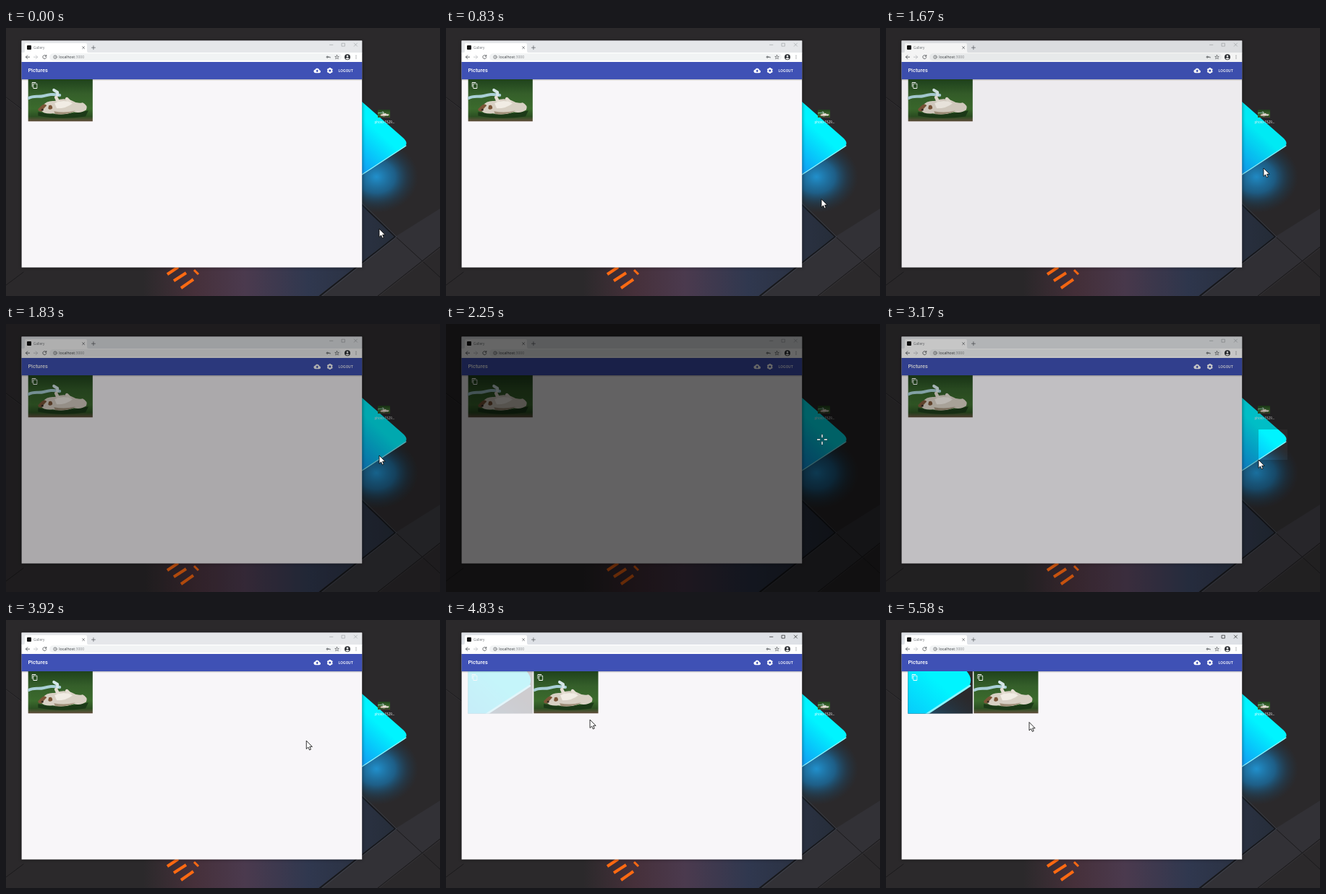
An HTML page for the animation above (5660 ms loop, 600 by 371 pixels).

```html
<!DOCTYPE html>
<html lang="en">
<head>
<meta charset="utf-8">
<title>Gallery paste demo</title>
<style>
  html, body { margin: 0; width: 100%; height: 100%; overflow: hidden; background: #2a292b; }
  svg { display: block; }
  #stage { width: 100%; height: 100%; }
  text { font-family: Roboto, sans-serif; }
  .ui { font-family: "Open Sans", "Noto Sans", sans-serif; }
  .line { fill: none; stroke-linecap: round; stroke-linejoin: round; }
</style>
</head>
<body>
<svg id="stage" viewBox="0 0 600 371">
  <defs>
    <linearGradient id="cyan" gradientUnits="userSpaceOnUse" x1="480" y1="196" x2="522" y2="150">
      <stop offset="0" stop-color="#1494f0"/>
      <stop offset=".5" stop-color="#08c4fa"/>
      <stop offset="1" stop-color="#00f4ff"/>
    </linearGradient>
    <radialGradient id="glow">
      <stop offset="0" stop-color="#2190cc"/>
      <stop offset=".45" stop-color="#1b6c9e" stop-opacity=".8"/>
      <stop offset=".75" stop-color="#1b4e70" stop-opacity=".35"/>
      <stop offset="1" stop-color="#1b3c54" stop-opacity="0"/>
    </radialGradient>
    <linearGradient id="pad" gradientUnits="userSpaceOnUse" x1="190" y1="0" x2="540" y2="0">
      <stop offset="0" stop-color="#2b292b"/>
      <stop offset=".2" stop-color="#46303a"/>
      <stop offset=".4" stop-color="#4b3a4e"/>
      <stop offset=".65" stop-color="#30384f"/>
      <stop offset="1" stop-color="#262d39"/>
    </linearGradient>
    <linearGradient id="grass" x2="0" y2="1">
      <stop offset="0" stop-color="#1f421c"/>
      <stop offset=".35" stop-color="#355f2a"/>
      <stop offset=".7" stop-color="#3b6b2d"/>
      <stop offset=".88" stop-color="#2c5022"/>
      <stop offset="1" stop-color="#66503f"/>
    </linearGradient>
    <filter id="soft" x="-10%" y="-10%" width="120%" height="120%"><feGaussianBlur stdDeviation="2"/></filter>
    <filter id="blur"><feGaussianBlur stdDeviation=".7"/></filter>

    <g id="copy">
      <path fill="#fff" transform="scale(.4)" d="M16 1H4c-1.1 0-2 .9-2 2v14h2V3h12V1zm3 4H8c-1.1 0-2 .9-2 2v14c0 1.1.9 2 2 2h11c1.1 0 2-.9 2-2V7c0-1.1-.9-2-2-2zm0 16H8V7h11v14z"/>
    </g>

    <symbol id="dog" viewBox="0 0 90 58" preserveAspectRatio="none">
      <rect width="90" height="58" fill="url(#grass)"/>
      <g filter="url(#blur)">
        <path class="line" stroke="#a9cfd6" stroke-width="4" d="M1 26C8 22 15 25 22 23S34 20 44 22"/>
        <path class="line" stroke="#d5e6e8" stroke-width="4" d="M36 15L41 18V22"/>
        <path fill="#1c3a18" d="M14 45Q45 52 84 43L80 51Q45 56 14 50Z"/>
        <path fill="#d8d0c4" d="M21 36Q26 29 37 30Q48 25 60 29Q68 34 76 32Q84 36 81 42Q74 47 64 45Q50 50 34 47Q22 48 18 43Q17 39 21 36Z"/>
        <path class="line" stroke="#e4ddd2" stroke-width="4.5" d="M42 31L39 25M58 31L54 27"/>
        <path fill="#f1ece4" d="M37 33Q50 27 62 33Q54 40 40 40Z"/>
        <path fill="#7c5638" d="M18 37Q23 32 26 36Q22 40 19 44Q14 45 14 41ZM29 36Q34 34 34 40Q30 43 28 40Z"/>
        <path fill="#a09079" d="M36 44Q52 47 66 43Q56 49 38 48Z"/>
        <circle cx="20" cy="42" r="1.4" fill="#332820"/>
      </g>
    </symbol>

    <g id="desk">
      <rect width="600" height="371" fill="#2b292b"/>
      <path fill="#323136" d="M538 289L434 371H514L600 303V250Z"/>
      <path fill="url(#pad)" d="M190 371V331L250 325L470 222L537 289L432 371Z"/>
      <path class="line" stroke="#15171c" stroke-width="1.6" d="M488 241L538 289L434 371"/>
      <path class="line" stroke="#464c58" stroke-width=".6" d="M490 240L540 289L437 371"/>
      <path class="line" stroke="#1b1a1c" d="M600 303L514 371M0 96L24 114M0 356L24 338M540 290L600 345"/>
      <path class="line" stroke="#3b393c" stroke-width=".5" d="M600 305L516 371M0 97L24 115"/>
      <ellipse cx="512" cy="206" rx="58" ry="50" fill="url(#glow)"/>
      <path fill="url(#cyan)" d="M470 83L492 102L549 152Q557 159 551 165L492 203L470 217Z"/>
      <path class="line" stroke="#8df4ff" stroke-width="1.2" d="M553 163L492 203"/>
      <g class="line" stroke="#ff6a12" stroke-width="4" style="stroke-linecap:butt">
        <path d="M223 341L238 331M232 350L249 339M242 360L259 348"/>
        <path stroke-width="3" d="M260 335L266 341"/>
      </g>
      <use href="#dog" x="514" y="113" width="17" height="11"/>
      <text class="ui" x="523.5" y="131.6" font-size="4.5" fill="#fff" text-anchor="middle">photo-1529...</text>
    </g>
  </defs>

  <use href="#desk"/>

  <rect x="21" y="18" width="472" height="314" fill="#000" opacity=".4" filter="url(#soft)"/>
  <g id="window">
    <rect x="21.6" y="17.6" width="470.6" height="313.9" fill="#f8f6f9"/>
    <rect id="strip" x="21.6" y="17.6" width="470.6" height="17"/>
    <path fill="#fff" d="M21.6 34H24Q26 34 26 32V23Q26 21 28 21H110Q112 21 112 23V32Q112 34 114 34H492.2V47H21.6Z"/>
    <rect x="29" y="24" width="6" height="6" rx="1" fill="#111"/>
    <text class="ui" x="38" y="29.2" font-size="4.7" fill="#74777b">Gallery</text>
    <g class="line" stroke="#55585c" stroke-width=".7">
      <path d="M105.6 25.7l3 3m0-3l-3 3M118.4 27.2h5m-2.5-2.5v5"/>
    </g>
    <g id="controls" class="line" stroke-width=".7">
      <path d="M447.5 23.3h4.4M464.4 21.2h4v4h-4zM481.3 21l4.2 4.2m0-4.2l-4.2 4.2"/>
    </g>
    <rect x="60" y="35.2" width="404" height="10" rx="5" fill="#f1f3f4"/>
    <g class="line" stroke="#505357" stroke-width=".85">
      <path d="M32.6 40.2h-5.2m2.4-2.4l-2.4 2.4 2.4 2.4"/>
      <path stroke="#bfc1c4" d="M38.4 40.2h5.2m-2.4-2.4l2.4 2.4-2.4 2.4"/>
      <path d="M55.4 38.7a2.5 2.5 0 1 0 .4 2M55.8 37.4v1.7h-1.7"/>
      <circle cx="68" cy="40.2" r="2.3" stroke-width=".6"/>
      <path stroke-width=".6" d="M68 40v1.2M68 39v.1"/>
      <circle cx="444.2" cy="40.2" r="1.1"/>
      <path d="M445.3 40.2h2.8v.9"/>
      <path stroke-width=".6" d="M457.5 37.5l.8 1.9 2 .1-1.6 1.3.6 2-1.8-1.1-1.8 1.1.6-2-1.6-1.3 2-.1z"/>
    </g>
    <text class="ui" x="73.3" y="42.1" font-size="5.2" fill="#33363a">localhost<tspan fill="#85888c">:3000</tspan></text>
    <circle cx="472" cy="40.2" r="4" fill="#2f3236"/>
    <circle cx="472" cy="39.1" r="1.3" fill="#fff"/>
    <path fill="#fff" d="M469.4 42.5Q472 39.9 474.6 42.5Q472 44.6 469.4 42.5Z"/>
    <path class="line" stroke="#505357" stroke-width="1" d="M484 38.2v0M484 40.2v0M484 42.2v0"/>

    <rect x="21.6" y="70" width="470.6" height="2.4" fill="#000" opacity=".2"/>
    <g id="dogCard">
      <use href="#dog" width="89.5" height="58.8"/>
      <use href="#copy" x="4.5" y="4"/>
    </g>
    <g id="newCard" transform="translate(30.4 70.7)">
      <svg width="89.5" height="58.8" viewBox="515 154 40 26" preserveAspectRatio="xMidYMid slice"><use href="#desk"/></svg>
      <use href="#copy" x="4.5" y="4"/>
    </g>
    <rect x="21.6" y="47" width="470.6" height="24" fill="#3f51b5"/>
    <g fill="#fff">
      <text x="30.4" y="61.4" font-size="7.4" font-weight="500">Pictures</text>
      <text x="459.6" y="60.8" font-size="5.15" font-weight="500" letter-spacing=".12">LOGOUT</text>
      <path transform="translate(425.4 54.2) scale(.4)" d="M19.35 10.04C18.67 6.59 15.64 4 12 4 9.11 4 6.6 5.64 5.35 8.04 2.34 8.36 0 10.91 0 14c0 3.31 2.69 6 6 6h13c2.76 0 5-2.24 5-5 0-2.64-2.05-4.78-4.65-4.96zM14 13v4h-4v-4H7l5-5 5 5h-3z"/>
    </g>
    <g transform="translate(447.8 59)" fill="none" stroke="#fff">
      <circle r="2.5" stroke-width="1.9"/>
      <path stroke-width="2" d="M0-4V-2.6M0 4V2.6M-3.5-2L-2.3-1.3M3.5 2L2.3 1.3M-3.5 2L-2.3 1.3M3.5-2L2.3-1.3"/>
    </g>
  </g>

  <path id="dim" fill-rule="evenodd"/>
  <path id="arrow" fill="#fff" stroke="#000" stroke-width=".8" stroke-linejoin="round" d="M0 0V11.4L2.6 9 4.3 12.9 6.2 12.1 4.6 8.3H8.1Z"/>
  <g id="cross" class="line">
    <path stroke="#000" stroke-opacity=".5" stroke-width="2.4" d="M-6.5 0H-3.2M6.5 0H3.2M0-6.5V-3.2M0 6.5V3.2"/>
    <path stroke="#fff" stroke-width="1.4" d="M-6.5 0H-3.2M6.5 0H3.2M0-6.5V-3.2M0 6.5V3.2"/>
  </g>
</svg>
<script>
const LOOP = 5660, STEP = 1000 / 12;
const $ = id => document.getElementById(id);
const set = (id, name, value) => $(id).setAttribute(name, value);
const show = (id, on) => set(id, 'visibility', on ? 'visible' : 'hidden');
const ramp = (t, a, b) => Math.min(1, Math.max(0, (t - a) / (b - a)));

// time, x, y
const pointer = [
  [0, 516, 278], [590, 516, 278], [1080, 522, 195], [1667, 522, 194],
  [1833, 516, 182], [2083, 520, 160], [2250, 520, 160], [2500, 555, 146],
  [2583, 555, 146], [2917, 515, 188], [3750, 515, 188], [3833, 480, 180],
  [3917, 415, 167], [4080, 282, 149], [4333, 199, 138], [5500, 199, 138], [5583, 198, 141.5]
];
const dragStart = 2583, cut = { x: 555, y: 146 };

function pointAt(t) {
  let i = 1;
  while (i < pointer.length - 1 && pointer[i][0] < t) i++;
  const [a, b] = [pointer[i - 1], pointer[i]], k = ramp(t, a[0], b[0]);
  return { x: a[1] + (b[1] - a[1]) * k, y: a[2] + (b[2] - a[2]) * k };
}

function draw(now) {
  const t = Math.floor((now % LOOP + 6) / STEP) * STEP;
  const p = pointAt(t);

  const snipping = t > 1980 && t < 2960;
  show('arrow', !snipping);
  show('cross', snipping);
  set(snipping ? 'cross' : 'arrow', 'transform', `translate(${p.x} ${p.y})`);

  const shade = 0.6 * (ramp(t, 1640, 2010) - ramp(t, 2935, 3305));
  const hole = t >= dragStart && t < 3400 ? `M${cut.x} ${cut.y}H${p.x}V${p.y}H${cut.x}Z` : '';
  set('dim', 'd', 'M0 0H600V371H0Z' + hole);
  set('dim', 'opacity', shade);

  const active = t > 4200;
  set('controls', 'stroke', active ? '#222' : '#a3a6aa');
  set('strip', 'fill', active ? '#dee1e6' : '#e5e7ea');

  const pasted = t > 4800;
  set('dogCard', 'transform', `translate(${pasted ? 121.2 : 30.4} 70.7)`);
  set('newCard', 'opacity', pasted ? ramp(t, 4750, 5170) : 0);
}

const start = performance.now();
function tick() {
  draw(performance.now() - start);
  requestAnimationFrame(tick);
}
tick();
</script>
</body>
</html>
```
